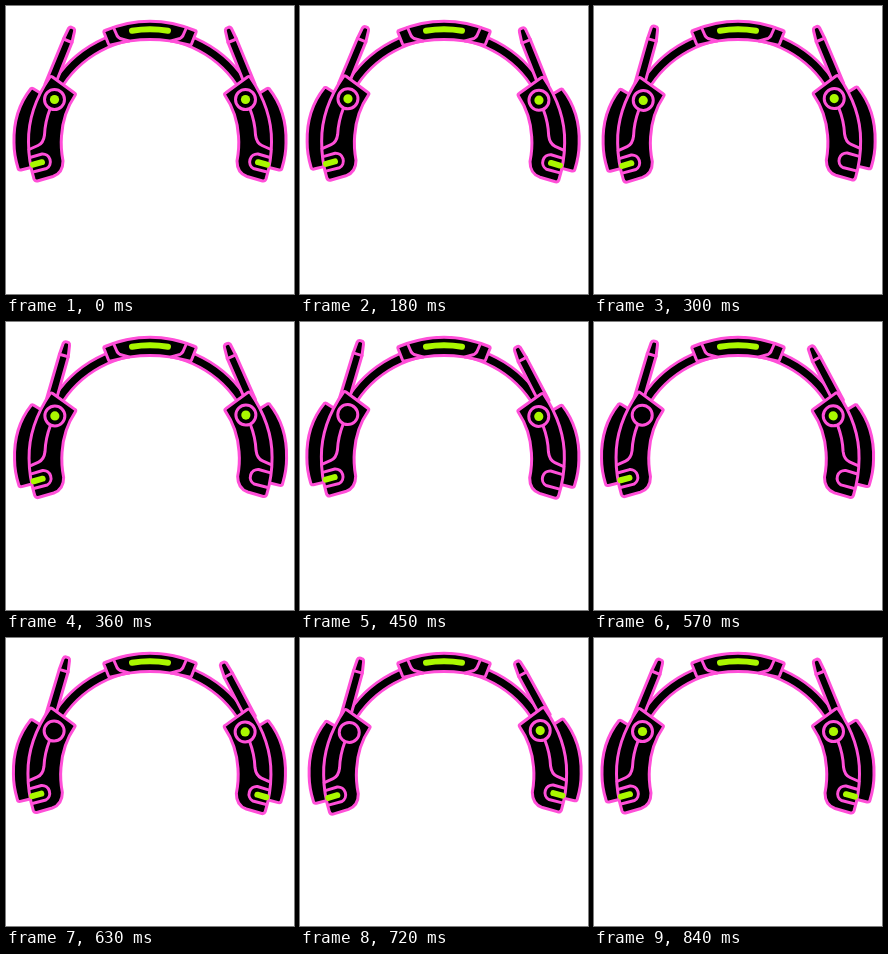
Recreate the animation shown at these times as an HTML page. Size 288 px wide and 288 px high, loop 0.87 s.

```html
<!DOCTYPE html>
<html>
<head>
<meta charset="utf-8">
<title>Headphones</title>
<style>
  html, body { margin: 0; width: 100%; height: 100%; overflow: hidden; background: #fff; }
  svg { display: block; width: 100vw; height: 100vh; }
  .line { stroke: #ff4fd8; stroke-width: 3; stroke-linejoin: round; stroke-linecap: round; }
  .open { fill: none; }
  .band { fill: none; stroke: #ff4fd8; stroke-width: 12.5; }
  .core { stroke: #000; stroke-width: 7; }
  .bar { fill: none; stroke: #aaf800; stroke-width: 6; stroke-linecap: round; }
  .dot { fill: #aaf800; }
</style>
</head>
<body>
<svg viewBox="0 0 288 288">
  <defs>
    <g id="antenna" class="line">
      <path d="M62.5 22.5Q64 20.5 66 21.5L68 22.5Q69 23.5 68.5 25.5L66 36.5L51 74L39 78L57.5 33Z"/>
      <path class="open" d="M57.5 33L66 36.5"/>
    </g>
    <g id="cup" class="line">
      <path d="M25 82.5Q7 105 8 137Q8 149 12 162Q12.500 164.500 15 164L27 161L36 88L27 82.500Q26 82 25 82.5Z"/>
      <path d="M44 71Q22 103 22.500 136Q22.500 155 28 173Q29 175.500 31.500 175L47 170.500Q57 167 57 155Q54.500 142 55.500 130Q57 107 69 89.500Q70 88 68.500 87L46.500 71Q45 70 44 71Z"/>
      <path class="open" d="M44 103Q39 116 38.500 129Q37.500 137 32 139.500L23 143.500M24 151.500L36 148A7.800 7.800 0 0 1 40.500 162.500L27 166"/>
      <circle cx="48.500" cy="93.500" r="10"/>
    </g>
  </defs>

  <path class="band" d="M46 89A109 109 0 0 1 242 89"/>
  <path class="band core" d="M46 89A109 109 0 0 1 242 89"/>
  <g class="line">
    <path d="M99 24.500Q144 6 189 24.500Q190.500 25 190 26.500L185.500 38Q185 39.500 183 39Q144 28 105 39Q103 39.500 102.500 38L98 26.500Q97.500 25 99 24.500Z"/>
    <path class="open" d="M107.500 21.500L111 29.500Q112 31.500 114 32.500L123 35M180.500 21.500L177 29.500Q176 31.500 174 32.500L165 35"/>
  </g>
  <path class="bar" d="M126 24.800Q144 21.800 162 24.800"/>

  <g id="phones">
    <g id="antennaL"><use href="#antenna"/></g>
    <use href="#cup"/>
    <circle id="dotL" class="dot" cx="48.500" cy="93.500" r="4.600"/>
    <path class="bar" d="M27 158.700L36 156.200"/>
    <g transform="matrix(-1 0 0 1 288 0)">
      <g id="antennaR"><use href="#antenna"/></g>
      <use href="#cup"/>
      <circle class="dot" cx="48.500" cy="93.500" r="4.600"/>
      <path id="barR" class="bar" d="M27 158.700L36 156.200"/>
    </g>
  </g>
</svg>
<script>
const LOOP = 870, STEP = 30;
const $ = id => document.getElementById(id);

// [time, shake] pairs, joined linearly
const shakeKeys = [[0, 0], [150, 0], [210, -1.5], [300, 1], [330, 1.5], [420, -1.5], [450, -1],
  [510, 1.5], [570, -0.4], [600, -1.5], [690, 1.5], [720, 1], [840, 0], [870, 0]];

function shakeAt(t) {
  const i = shakeKeys.findIndex(k => k[0] > t);
  const [t0, a] = shakeKeys[i - 1], [t1, b] = shakeKeys[i];
  return a + (b - a) * (t - t0) / (t1 - t0);
}

function ease(t, from, to) {
  const x = Math.min(1, Math.max(0, (t - from) / (to - from)));
  return x * x * (3 - 2 * x);
}

const rotate = (id, angle, x, y) => $(id).setAttribute('transform', `rotate(${angle} ${x} ${y})`);
const light = (id, on) => $(id).style.visibility = on ? 'visible' : 'hidden';

function draw() {
  const t = Math.floor((performance.now() % LOOP) / STEP + 0.01) * STEP % LOOP;
  const back = ease(t, 720, 840);
  rotate('phones', -0.55 * shakeAt(t), 144, 18);
  rotate('antennaL', -6 * (ease(t, 190, 290) - back), 44, 72);
  rotate('antennaR', 6 * (ease(t, 330, 430) - back), 44, 72);
  light('dotL', t < 390 || t >= 780);
  light('barR', t < 240 || t >= 630);
  requestAnimationFrame(draw);
}
draw();
</script>
</body>
</html>
```
